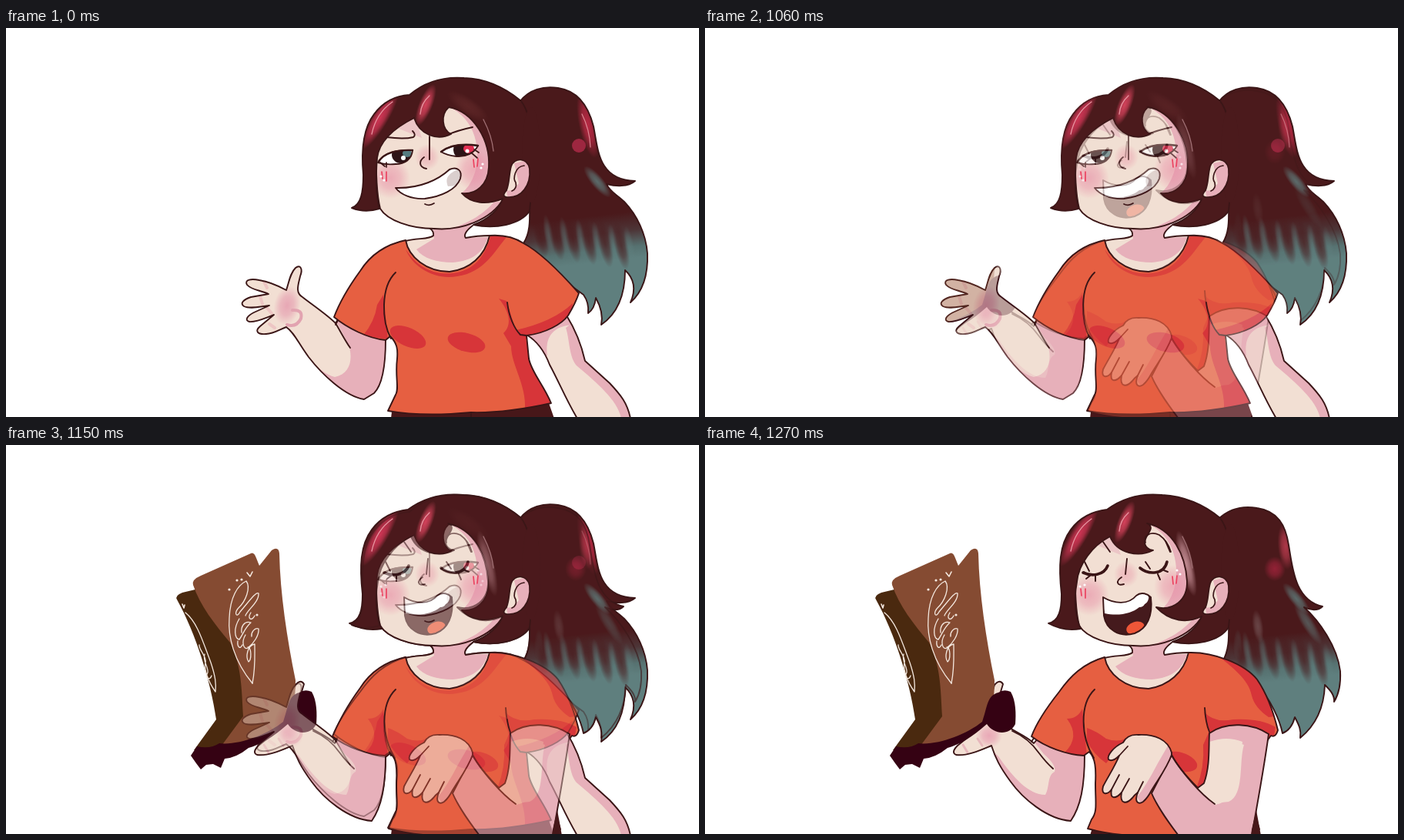
An HTML page with a canvas for the animation above (2.27 s loop, 900x506 px).

```html
<!DOCTYPE html>
<html lang="en">
<head>
<meta charset="utf-8">
<title>Showing the boots</title>
<style>
html, body { margin: 0; width: 100%; height: 100%; overflow: hidden; background: #fff; }
canvas { display: block; }
</style>
</head>
<body>
<canvas id="stage" width="900" height="506"></canvas>
<script>
const W = 900, H = 506;
const INK = '#3a1516', HAIR = '#4a191b', TEAL = '#5f7f7e', SKIN = '#f2dfd3', PINK = '#e7b0ba',
  ORANGE = '#e65f41', RED = '#d73539', SOLE = '#350213';
const stage = document.getElementById('stage').getContext('2d');
let c;

const fill = (d, color) => { c.fillStyle = color; c.fill(new Path2D(d)); };
function line(d, width = 1.9, color = INK) {
  c.strokeStyle = color;
  c.lineWidth = width;
  c.stroke(new Path2D(d));
}
// Filled shape, optional shading kept inside it, then its outline.
function shape(d, color, shade, outline = INK) {
  fill(d, color);
  if (shade) {
    c.save();
    c.clip(new Path2D(d));
    shade();
    c.restore();
  }
  if (outline) line(d, 1.9, outline);
}
function oval(x, y, rx, ry, deg, color) {
  c.fillStyle = color;
  c.beginPath();
  c.ellipse(x, y, rx, ry, deg * Math.PI / 180, 0, 7);
  c.fill();
}
function glow(x, y, rx, ry, deg, rgb, alpha) {
  c.save();
  c.translate(x, y);
  c.rotate(deg * Math.PI / 180);
  c.scale(rx, ry);
  const g = c.createRadialGradient(0, 0, 0, 0, 0, 1);
  g.addColorStop(0, `rgba(${rgb},${alpha})`);
  g.addColorStop(.5, `rgba(${rgb},${alpha * .7})`);
  g.addColorStop(1, `rgba(${rgb},0)`);
  c.fillStyle = g;
  c.fillRect(-1, -1, 2, 2);
  c.restore();
}

function ponytail(b) {
  const d = b
    ? 'M667 96C682 82 700 79 717 82C744 86 754 104 758 130C763 160 766 202 802 210C796 216 786 215 778 211C798 229 821 262 825 294C826 313 822 326 817 334C818 325 811 318 805 312C804 340 794 364 773 381C775 370 770 362 766 354C764 362 760 371 750 375C747 360 735 330 715 310L672 282C682 265 680 245 680 230Z'
    : 'M667 96C679 80 698 75 717 78C744 82 757 104 763 128C769 158 769 198 817 199C808 207 792 206 780 203C784 213 794 217 803 226C820 244 831 268 833 293C834 320 827 343 811 357C818 341 817 327 804 315C804 347 795 371 773 386C776 372 771 360 766 351C765 360 762 367 756 371C757 362 755 354 750 347L720 325L672 280C682 265 680 245 680 230Z';
  const g = c.createLinearGradient(750, 246, 757, 306);
  g.addColorStop(0, HAIR);
  g.addColorStop(.4, '#4d3537');
  g.addColorStop(.75, '#567170');
  g.addColorStop(1, TEAL);
  shape(d, g, () => {
    glow(768, 200, 26, 8, 50, '95,127,126', .8);
    if (b) {
      glow(718, 236, 7, 22, -8, '130,105,106', .55);
      glow(783, 232, 32, 8, 58, '95,127,126', .6);
      glow(692, 262, 6, 22, 0, '95,127,126', .45);
    }
    for (let i = 0; i < 6; i++) {
      const x = 694 + i * 21, y = 268 + (i * 37 % 17);
      glow(x, y, 9, 32, -12, '74,25,27', .7);
      glow(x + 11, y + 2, 6, 28, -10, '95,127,126', .45);
    }
    if (b) {
      glow(754, 132, 10, 30, -5, '190,60,80', .85);
      glow(740, 161, 14, 16, 0, '150,34,55', .95);
    } else {
      glow(756, 126, 12, 44, -12, '190,42,70', .95);
      oval(744, 153, 9, 9, 0, '#9d2740');
      line('M748 112Q758 132 759 155', 1.2, '#dc8793');
    }
  });
}

function eyesOpen() {
  shape('M483 175C488 165 501 158 528 159C527 171 518 177 506 177C496 178 489 177 483 175Z', '#fff', () => {
    oval(513, 165, 12, 11, 0, '#2d1417');
    oval(521, 163, 6, 5, 0, '#557b80');
    oval(516, 169, 3, 3, 0, '#fff');
  });
  shape('M565 161C575 153 591 150 613 153C608 163 597 168 585 167C576 166 570 164 565 161Z', '#fff', () => {
    oval(592, 158, 11, 12, 0, '#2d1417');
    oval(601, 157, 7, 6, 0, '#e22f52');
    oval(599, 160, 2.5, 2.5, 0, '#fff');
  });
  line('M484 174C491 162 509 158 528 159M565 161C577 152 592 150 613 153', 2.4);
  line('M486 175L492 180M494 175V181M604 162L612 169M608 158L614 162', 1.7);
  line('M485 141C497 142 513 146 529 142Q533 139 528 134M550 141V171M543 168C536 173 536 181 546 183M573 139Q587 133 606 129');
}

function eyesClosed() {
  line('M491 166C502 171 518 170 523 157M565 160C576 169 596 169 600 152', 3.6);
  line('M493 152L499 164M499 170L492 165M507 170V177M500 170L495 174M572 152L578 161M588 168L591 175M596 163L601 165', 2);
  line('M517 126L526 139M548 148L546 168M541 172C533 177 535 184 544 181M598 125L604 139');
}

function mouth(b) {
  if (!b) {
    shape('M506 208C538 209 562 197 576 184C586 180 593 185 590 196C585 210 566 219 544 222C526 223 512 216 506 208Z', '#fff', () => {
      fill('M574 206C569 194 576 189 588 183L595 204Z', '#dacfce');
    });
    line('M544 229Q550 232 556 228', 1.7);
    return;
  }
  shape('M517 198C532 207 550 208 560 196C567 190 575 194 579 198C582 222 574 239 558 245C538 251 521 240 518 222Z', '#451a1d', () => {
    fill('M515 197C532 207 550 208 560 196C567 189 578 194 576 200Q575 205 571 207Q569 211 564 211C555 219 537 223 519 219Z', '#fff');
    oval(559, 238, 12, 8, -18, '#ee5638');
  });
}

function head(b) {
  // Neck and chest
  shape('M519 277C535 273 550 275 555 270C557 265 554 260 551 255L608 252C598 263 594 268 597 273L629 270L632 320H520Z', SKIN, () => {
    fill('M550 254L610 252L596 273L626 272C620 292 606 303 580 305C560 305 542 300 533 288L556 274Z', PINK);
  }, null);
  line('M519 277C535 273 550 275 555 270Q556 265 551 261M606 257C597 264 594 270 597 273Q612 270 629 270');
  // Face
  shape('M481 150C480 190 481 215 486 235C495 250 525 261 556 261C590 264 630 250 646 222L650 145L560 85L500 110Z', SKIN, () => {
    fill('M574 102C611 118 617 160 609 188Q603 207 590 216L640 210V120Z', PINK);
    fill('M575 262C604 253 622 240 634 226L650 225L610 270Z', PINK);
    fill('M482 150L530 112L540 143L508 130Z', '#ecc6c7');
    glow(499, 195, 26, 27, 0, '232,150,170', .7);
    glow(607, 184, 24, 28, 0, '232,140,165', .6);
    glow(547, 168, 16, 17, 0, '232,155,170', .55);
  });
  if (b) eyesClosed(); else eyesOpen();
  mouth(b);
  line('M488 187L489 196M494 187L494 199M607 171L608 181M613 170L612 180', 1.7, '#ec4260');
  for (const [x, y] of b ? [[487, 184], [493, 182], [613, 163], [617, 168]] : [[487, 193], [491, 198], [619, 177], [617, 182]])
    oval(x, y, 1.6, 1.6, 0, '#fff');
  // Hair
  const d = b
    ? 'M446 232C460 229 463 214 463 194C459 158 460 130 475 110C487 94 504 86 522 84C541 70 565 62 594 65C627 67 651 80 669 95C688 120 686 180 680 237C668 256 635 262 607 256C627 249 641 235 645 223C626 232 604 230 586 211C608 216 627 202 626 177C624 144 608 109 574 102C587 108 570 117 571 128Q573 136 582 137C564 146 535 142 526 119C503 131 485 155 483 178C478 205 482 227 488 239C472 242 457 238 446 232Z'
    : 'M449 234C461 230 464 214 464 191C461 158 464 130 478 112C490 96 506 88 524 87C544 70 569 63 595 65C627 66 651 80 669 95C688 120 686 180 680 238C668 256 635 262 607 256C627 249 641 235 645 222C625 230 604 229 592 215C610 217 626 204 627 181C629 147 608 109 575 103C564 113 566 132 578 138C560 147 537 139 530 117C504 130 485 146 482 169C480 194 480 217 485 235C472 239 459 238 449 234Z';
  shape(d, HAIR, () => {
    glow(485, 118, 11, 46, 31, '207,53,84', 1);
    glow(545, 100, 9, 29, 22, '211,65,90', 1);
    if (b) glow(625, 154, 9, 44, -14, '230,174,182', .75);
    else glow(600, 102, 32, 11, 35, '110,48,48', .5);
    line('M475 138C479 119 489 105 502 96M538 112Q539 98 550 88', 1.3, '#e795a0');
    line('M620 119Q631 140 633 160', 1.3, '#a17074');
  });
  oval(682, 165, 12, 62, 0, HAIR);
  if (b) line('M572 127C569 117 579 112 590 117Q601 125 605 139', 1.8);
  // Ear
  shape('M656 180C660 168 677 168 680 183C682 204 670 222 650 220Q643 219 650 211C654 202 653 190 656 180Z', SKIN, () => {
    fill('M660 176L685 170V202L652 225L650 211Q659 214 666 202Z', PINK);
  });
  line('M673 179C661 180 658 196 662 201Q664 209 657 212', 1.7);
}

const pants = d => fill(d, '#471719');

function poseA() {
  ponytail(false);
  head(false);
  // Lowered arm
  shape('M676 399C691 408 700 422 706 438C718 460 728 485 742 508H811C807 488 799 478 784 462L752 433C747 411 738 390 728 374Z', SKIN, () => {
    fill('M676 398L732 372L735 386C714 388 699 398 703 427Z', PINK);
    fill('M735 384L752 433L812 480V508H799C795 485 768 462 742 440C731 430 732 404 727 390Z', PINK);
  });
  // Raised arm with open palm
  shape('M385 350C399 361 417 373 428 384L440 365L493 405C493 440 489 464 478 475L465 483C440 479 410 450 393 428C379 409 375 397 364 389C356 392 347 398 338 398C326 399 323 394 330 388L348 373C337 377 325 383 316 382C309 380 314 374 322 370L342 361C331 362 317 366 309 362C303 358 309 353 318 350L341 346C331 341 319 341 313 334C309 327 319 326 329 328C342 330 353 335 364 341C368 329 369 319 376 312C382 307 386 313 382 323C380 333 375 344 385 350Z', SKIN, () => {
    fill('M428 380L445 412C451 431 447 450 427 454C405 448 389 425 372 399L362 390L395 460L465 490L500 470V398Z', PINK);
    glow(365, 361, 17, 26, 12, '229,157,175', .85);
    line('M372 367Q386 366 383 378Q377 390 365 386', 4, '#e2a3b0');
    line('M335 330L339 338M330 349L333 359M338 363L345 371M342 385L349 390', 4, '#edc6c4');
  });
  line('M428 384C434 394 440 406 447 416M428 386L434 374');
  pants('M501 499C550 503 650 500 705 488L712 508H500Z');
  shape('M519 276C491 282 472 297 460 316C444 338 432 360 426 376C443 390 470 404 493 406L499 401C508 410 509 418 508 430C505 453 511 470 506 477L496 498C535 505 572 503 604 500C641 501 681 494 708 488C698 464 682 447 679 430L676 400C701 397 722 385 730 374C736 364 741 354 744 345C721 319 693 291 672 280C657 270 642 269 628 270C622 297 602 314 576 317C546 317 523 298 519 276Z', ORANGE, () => {
    fill('M522 292C540 318 567 323 590 317C615 310 625 288 630 268L650 272C634 291 621 318 586 323C557 328 529 312 519 288Z', RED);
    fill('M490 347L496 405L463 401Q479 382 482 360Z', RED);
    fill('M650 355L662 393Q711 382 736 358L732 390L675 405L684 440L712 490L674 496C676 464 656 438 656 414L646 397C657 387 655 370 640 352Z', RED);
    oval(522, 402, 25, 12, 24, RED);
    oval(598, 409, 25, 12, 15, RED);
  });
  line('M506 318C486 337 488 382 500 404M651 357C653 375 660 391 668 399L676 400');
  line('M604 500V506');
}

function boots() {
  fill('M222 201Q219 196 229 192L250 187L300 240L325 352L278 398L244 397L273 357C266 308 247 246 222 201Z', '#4a290f');
  fill('M243 182Q241 175 253 170L318 141Q322 139 325 147L329 157L345 137Q354 131 355 141C356 193 365 252 376 306C376 331 373 350 361 362C339 382 306 395 280 391L308 353C306 318 306 286 291 257C271 233 252 209 243 182Z', '#854b32');
  fill('M240 404L248 392Q265 396 277 388C301 391 339 377 360 360C367 340 366 326 381 322Q388 317 397 321C404 333 404 350 403 363C396 378 375 377 366 363C347 380 330 390 315 394Q299 407 284 408L279 420L269 415L260 416L253 422L247 414Z', SOLE);
  const thread = (d, w = 1.3) => line(d, w, '#f4e8df');
  thread('M320 310C296 281 288 249 290 225C291 198 301 182 312 177C318 185 312 203 301 213C296 220 300 225 304 217C316 203 325 190 328 193C329 204 313 215 311 222');
  thread('M320 310C324 290 323 275 323 259C313 261 311 276 315 282C319 279 319 264 314 263M303 226C295 239 297 252 303 253C308 246 310 238 318 231C309 228 305 237 306 244M311 247C305 257 309 267 314 264C322 258 329 247 328 239C323 237 318 244 319 249M301 255C300 262 304 267 307 260M318 218C313 226 319 230 323 222');
  thread('M233 218C249 231 256 257 266 283C272 301 273 310 272 321C262 307 257 291 259 283C261 275 250 266 251 260M258 272C255 281 263 288 262 296C258 303 265 307 267 300');
  thread('M229 207L231 212L232 208M313 166L317 171L320 165', 1.6);
  for (const [x, y] of [[290, 188], [300, 176], [306, 175], [326, 221]]) oval(x, y, 1.6, 1.6, 0, '#f4e8df');
}

function poseB() {
  ponytail(true);
  head(true);
  // Holding arm
  shape('M376 312Q383 304 387 311L384 321L388 362C398 372 416 377 427 388L440 373L493 403C493 444 488 470 475 489C444 487 412 459 397 438C383 419 377 407 372 391C360 396 341 405 326 403Q319 400 328 391L360 365Z', SKIN, () => {
    fill('M425 383L440 402Q457 417 454 425C444 430 448 445 442 455C420 455 400 432 381 405L373 397L400 465L480 495L500 398Z', PINK);
    glow(369, 378, 17, 16, 0, '230,150,173', .75);
    line('M335 390L341 400M354 382L360 391', 3, '#e7b7bc');
  });
  line('M399 372C415 379 425 388 434 401Q443 413 452 421M424 386L431 375');
  boots();
  pants('M503 498H712L722 508H500Z');
  shape('M519 276C491 284 474 301 460 321C445 340 431 360 424 379C442 393 470 403 492 404L499 399C507 407 508 421 507 440C507 466 510 477 502 487L497 499Q525 507 560 508H711L720 500C707 460 710 410 735 378Q741 381 744 371C738 346 730 324 717 305C701 285 661 269 628 270C622 296 602 313 576 317C546 317 523 298 519 276Z', ORANGE, () => {
    fill('M490 343L496 405L467 400Q488 380 470 356Q484 356 490 343Z', RED);
    fill('M664 272C684 289 706 304 710 326Q714 342 732 354L748 352L715 290Z', RED);
    fill('M648 347Q661 362 686 357Q721 355 741 367L738 383C706 360 676 361 655 375Z', RED);
    fill('M496 368Q508 372 521 382Q535 387 546 382L521 414Q504 402 496 385Z', RED);
    oval(617, 412, 23, 12, 17, RED);
    fill('M655 372L660 450L638 447Q649 419 647 390Z', RED);
  });
  line('M506 318C486 337 488 380 505 407M649 342Q650 361 655 373');
  // Crossed arm
  shape('M655 375C677 359 711 362 732 376C726 420 719 458 710 508H615C603 492 588 472 580 453L606 403C614 419 626 432 640 446L648 440C656 418 654 394 655 375Z', SKIN, () => {
    fill('M655 375Q695 352 734 374L710 510H612L578 455L590 435L606 402L640 447L663 468C693 462 693 427 698 386Q677 378 656 386Z', PINK);
    fill('M655 386Q680 382 700 390C693 412 701 455 680 464L661 466L648 444Q655 420 655 386Z', SKIN);
  });
  line('M606 404C619 425 642 453 662 467');
  pants('M710 500L716 475L722 508H709Z');
  // Hand on chest
  shape('M606 400C601 383 584 376 563 377C551 376 546 381 543 387C530 393 522 404 524 409C529 413 535 407 538 404C533 417 522 434 517 444C514 455 522 456 528 448C525 462 534 460 541 452C538 468 548 467 555 459Q558 455 562 452C557 465 563 468 569 464Q575 459 580 449C589 434 600 420 606 403Z', SKIN, () => {
    fill('M609 400L603 388L588 414Q573 443 561 458L568 468L590 449Z', PINK);
  });
  line('M538 404L549 392M528 448L538 429M541 452L551 434M561 454L569 438', 1.8);
}

function render(draw) {
  const layer = document.createElement('canvas');
  layer.width = W;
  layer.height = H;
  c = layer.getContext('2d');
  c.lineJoin = c.lineCap = 'round';
  draw();
  return layer;
}
const first = render(poseA), second = render(poseB);

function frame(now) {
  const t = now % 2270;
  const step = t < 1000 ? 0 : Math.min(10, Math.floor((t - 1000) / 30) + 1);
  stage.globalCompositeOperation = 'source-over';
  stage.clearRect(0, 0, W, H);
  if (step === 10) {
    stage.drawImage(second, 0, 0);
  } else {
    // Blend inside the first silhouette; the rest of the second pops in past halfway.
    stage.drawImage(first, 0, 0);
    stage.globalCompositeOperation = 'source-atop';
    stage.globalAlpha = step / 10;
    stage.drawImage(second, 0, 0);
    stage.globalAlpha = 1;
    if (step > 5) {
      stage.globalCompositeOperation = 'destination-over';
      stage.drawImage(second, 0, 0);
    }
  }
  requestAnimationFrame(frame);
}
requestAnimationFrame(frame);
</script>
</body>
</html>
```
